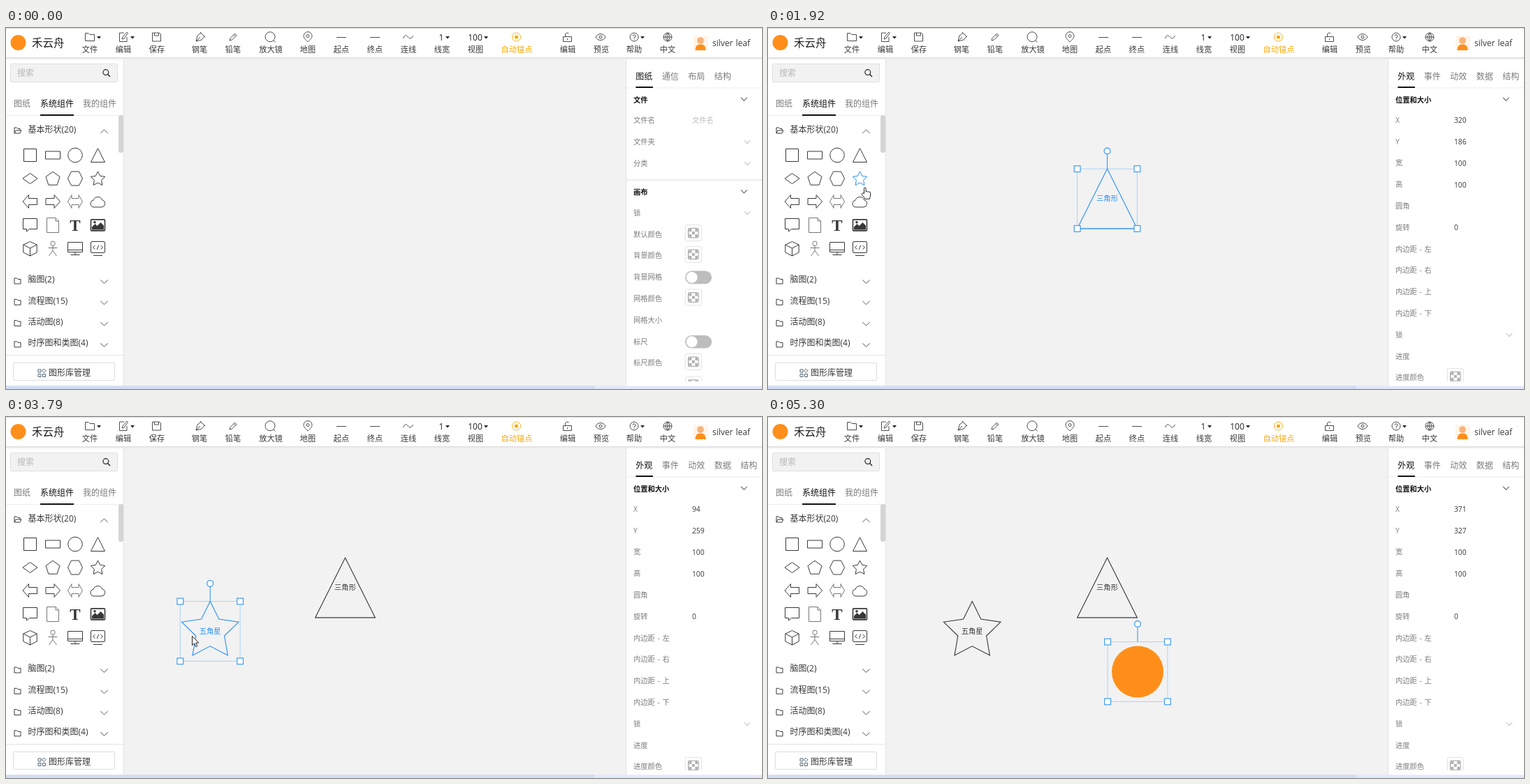
An HTML page for the animation above (5.61 s loop, 1082 by 518 pixels).

```html
<!DOCTYPE html>
<html lang="zh">
<head>
<meta charset="utf-8">
<title>图形编辑器</title>
<style>
html, body { margin: 0; width: 100%; height: 100%; overflow: hidden; background: #fff; }
svg { display: block; width: 1082px; height: 518px; }
text { font-family: "Open Sans", "Noto Sans CJK SC", "Noto Sans CJK", sans-serif; white-space: pre; word-spacing: 1px; }
</style>
</head>
<body>
<svg id="stage" viewBox="0 0 1082 518" xmlns="http://www.w3.org/2000/svg"></svg>
<script>
const LOOP = 5610;
const BLUE = '#2a90f5', INK = '#383838', GREY = '#7c7c7c', ORANGE = '#ff8f1a', GOLD = '#f7ab0a';

// ---- markup helpers ----
const rect = (x, y, w, h, fill, more = '') =>
  `<rect x="${x}" y="${y}" width="${w}" height="${h}" fill="${fill}" ${more}/>`;
const circle = (x, y, r, fill, more = '') =>
  `<circle cx="${x}" cy="${y}" r="${r}" fill="${fill}" ${more}/>`;
const path = (d, more = '') => `<path d="${d}" ${more}/>`;
const group = (inner, more = '') => `<g ${more}>${inner}</g>`;
const at = (x, y, inner, more = '') => group(inner, `transform="translate(${x} ${y})" ${more}`);
const line = (d, color = INK, w = 1) => path(d, `fill="none" stroke="${color}" stroke-width="${w}"`);
const text = (x, cy, s, size = 12, color = INK, more = '') =>
  `<text x="${x}" y="${(cy + size * 0.37).toFixed(2)}" font-size="${size}" fill="${color}" ${more}>${s}</text>`;
const mid = 'text-anchor="middle"';
const chevron = (x, y, w, h, color) => line(`M${x - w} ${y - h / 2}l${w} ${h} ${w} ${-h}`, color);

function ring(n, r, inner) {
  const count = inner ? n * 2 : n;
  const pts = Array.from({ length: count }, (_, i) => {
    const a = i * 2 * Math.PI / count, k = inner && i % 2 ? inner : r;
    return `${(k * Math.sin(a)).toFixed(2)} ${(-k * Math.cos(a)).toFixed(2)}`;
  });
  return `M${pts.join('L')}Z`;
}

// ---- header ----
const FOLDER = 'M-6.5-5.5H-2L0-3.5H6.5V5.5H-6.5Z';
const tools = [
  [120, '文件', 120, path(FOLDER), 133],
  [168, '编辑', 168, path('M1-6H-5.5V6.5H5V0M-2 3L-1 0 5-7 6.5-5.5 1 2Z'), 181],
  [216, '保存', 215.5, path('M-6-6H4L6-4V6H-6ZM-3-6V-2H3V-6')],
  [277, '钢笔', 278, path('M-6 6L-4-2 1-6 6-1 2 4ZM-6 6L0 0M0-7L7 0')],
  [325, '铅笔', 325, path('M-5 5L-4 1.5 2.5-5 5-2.5-1.5 4ZM1-3.5L3.5-1')],
  [379, '放大镜', 378, circle(0, -0.3, 7, 'none') + path('M5 4.7L7.5 7.5')],
  [432, '地图', 432, path('M0 7C-4 3-6 1-6-1.5A6 6 0 0 1 6-1.5C6 1 4 3 0 7Z') + circle(0, -1.5, 2, 'none')],
  [480, '起点', 480, path('M-7 .5H7')],
  [528, '终点', 528, path('M-7 .5H7')],
  [576, '连线', 575.5, path('M-7 2C-4-5-2-2 0 0S4 4 7-2')],
  [624, '线宽', 0, '', 632],
  [672, '视图', 0, '', 687],
  [731, '自动锚点', 730.5, circle(0, 0, 6, 'none') + circle(0, 0, 2.6, GOLD, 'stroke="none"'), 0, GOLD],
  [804, '编辑', 803.5, path('M-6-.5H6V6.5H-6ZM-3-.5V-4A3 3 0 0 1 2-5M0 2V4')],
  [852, '预览', 851, path('M-7 0C-4-6 4-6 7 0C4 6-4 6-7 0Z') + circle(0, 0, 2, 'none')],
  [899, '帮助', 899, circle(0, 0, 6, 'none') + path('M-2-1.5A2 2 0 1 1 0 .8V2M0 3V4'), 911],
  [947, '中文', 947, circle(0, 0, 6, 'none') + path('M-6 0H6M0-6V6M0-6C-4-2-4 2 0 6M0-6C4-2 4 2 0 6')],
];

function header() {
  let s = rect(0, 0, 1082, 43, '#fff') + rect(0, 0, 1082, 1, '#dcdcdc')
    + rect(0, 42, 1082, 1, '#dedede') + rect(0, 43, 1082, 2, '#ececec');
  s += circle(17.5, 21, 11, ORANGE) + text(37, 21.5, '禾云舟', 15.5, '#222');
  for (const [x, label, ix, icon, caret, color = INK] of tools) {
    s += text(x, 31, label, 11.2, color, mid);
    if (icon) s += at(ix, 13, icon, `fill="none" stroke="${color}" stroke-width="0.9"`);
    if (caret) s += path(`M${caret - 3} 12h6l-3 3.4Z`, 'fill="#222"');
  }
  s += text(623, 14, '1', 12, '#222', mid) + text(671.5, 14, '100', 12, '#222', mid);
  s += rect(984, 11, 21, 21, '#fff5e8') + circle(994, 18, 4.8, '#f8b27a')
    + path('M986.5 32C986.5 26 989 23.5 994 23.5S1001.5 26 1001.5 32Z', `fill="${ORANGE}"`);
  return s + text(1011, 21.5, 'silver leaf', 12, INK);
}

// ---- left panel ----
const COLS = [34.5, 67, 99, 131.5], ROWS = [182.5, 216, 249, 282.5, 316.5];
const LEFT = 'M-10.5 0L-2-9.5V-4.5H10V4.5H-2V9.5Z';
const soft = 'stroke="#777"';
const own = 'fill="currentColor" stroke="none"';
const icons = [
  path('M-9-9H9V9H-9Z'),
  path('M-10.5-5.5H10.5V5.5H-10.5Z'),
  circle(0, 0, 10.3, 'none'),
  path('M0-9.8L10 10H-10Z'),
  path('M0-7.5L10.5 0 0 7.5-10.5 0Z'),
  at(0, 0.7, path(ring(5, 10.5))),
  path('M-5.5-10H5.5L10.5 0 5.5 10H-5.5L-10.5 0Z'),
  at(0, 0.7, path(ring(5, 10.8, 5.4))),
  path(LEFT),
  path(LEFT, 'transform="scale(-1 1)"'),
  path('M-10.5 0L-5-9.5V-4.5H5V-9.5L10.5 0 5 9.5V4.5H-5V9.5Z', soft),
  path('M-5.5 8A4.9 4.9 0 0 1-6.5-1.7A6.8 6.8 0 0 1 6.4-2A5.1 5.1 0 0 1 5.5 8Z'),
  path('M-10-9H10V6H-1L-5 9.5V6H-10Z'),
  path('M-8.5-10H4L8.5-5.5V11H-8.5ZM4-10V-5.5H8.5', soft),
  `<text y="8" font-size="23" font-weight="bold" style="font-family:'Liberation Serif',serif" ${mid} ${own}>T</text>`,
  rect(-10, -7.6, 20, 16, 'none', 'stroke-width="1.6" rx="1"')
    + path('M-8.5 7V3L-4-1.5-1 1.5 4-3.5 8.5 1V7Z', own) + circle(-4.5, -3.8, 1.8, 'currentColor', 'stroke="none"'),
  path('M0-10L9.7-5.5V5.5L0 10.5-9.7 5.5V-5.5ZM-9.7-5.5L0-.5 9.7-5.5M0-.5V10.5'),
  circle(0, -7.3, 3.2, 'none', soft) + path('M0-4V3M-6.5-1H6.5M-5.5 10.5L0 3 5.5 10.5', soft),
  path('M-10.5-9H10.5V5H-10.5ZM-10.5 2H10.5M-6.5 9H6.5M0 5V9'),
  rect(-10, -10, 20, 16, 'none', 'rx="1.5"') + path('M-4-4.5L-7-1.7-4 1M4-4.5L7-1.7 4 1M1.3-5L-1.3 1.5M-6.5 10H6.5'),
];
const icon = (i, x, y, color, more = '') =>
  at(x, y, icons[i], `fill="none" stroke="${color}" color="${color}" ${more}`);

function leftPanel() {
  let s = rect(0, 45, 168, 468, '#fff') + rect(168, 44, 1, 469, '#e2e2e2');
  s += rect(6.5, 51.5, 153, 26, '#f2f2f2', 'stroke="#dfdfdf" rx="1"') + text(16, 65, '搜索', 12, '#b8b8b8');
  s += circle(142.8, 63.6, 3.9, 'none', 'stroke="#222" stroke-width="1.2"') + line('M145.7 66.5L149 70', '#222', 1.4);
  s += rect(0, 125, 168, 1, '#eee') + text(11, 108.5, '图纸', 12, GREY)
    + text(49, 108.5, '系统组件', 12, '#111') + text(110, 108.5, '我的组件', 12, GREY) + rect(49, 124, 48, 2, '#111');
  s += rect(161, 125, 7, 54, '#d4d4d4', 'rx="3"');
  s += line('M12 151V143H15.5L17 144.5H20V147M12 151L14 147H22L20 151Z') + text(31.5, 146, '基本形状(20)');
  s += chevron(140.5, 148.5, 5.2, -5, '#555');
  icons.forEach((_, i) => { s += icon(i, COLS[i % 4], ROWS[i >> 2], INK, `id="icon${i}"`); });
  ['脑图(2)', '流程图(15)', '活动图(8)', '时序图和类图(4)'].forEach((name, i) => {
    const y = 361 + i * 30.3;
    s += at(16.5, y + 2, line('M-4.5-4H-1L.5-2.5H4.5V4H-4.5Z')) + text(31.5, y, name) + chevron(140.5, y + 3, 5.2, 5, '#555');
  });
  s += rect(0, 469, 168, 1, '#e4e4e4') + rect(10.5, 480.5, 145, 25, '#fff', 'stroke="#dcdcdc" rx="1"');
  s += at(51, 495, line('M-5-5H-1V-1H-5ZM-5 1.5H-1V5.5H-5ZM1.5 1.5H5.5V5.5H1.5ZM3.3-6L6-3.2 3.3-.5 .6-3.2Z', '#567'));
  return s + text(61, 495, '图形库管理');
}

// ---- right panel ----
const lightChevron = y => chevron(1061, y, 4, 4.5, '#aaa');
const heading = (y, s) => text(898, y, s, 10.28, '#111', 'font-weight="bold"') + chevron(1056.3, y - 0.8, 4.2, 4.8, '#222');
const label = (y, s) => text(898, y, s, 10.28, GREY);
function swatch(y) {
  let s = rect(-11.5, -11.5, 23, 23, '#fff', 'stroke="#e2e2e2" rx="2"') + rect(-7.3, -6.8, 14.6, 13.6, '#fff', 'stroke="#999" rx="1.5"');
  for (const [x, v] of [[-6.5, -6], [2.5, -6], [-2, -2], [-6.5, 2], [2.5, 2]]) s += rect(x, v, 4, 4, '#b2b2b2');
  return at(983.8, y, s);
}
const toggle = y => rect(972, y - 9.3, 38, 18.6, '#bdbdbd', 'rx="9.3"') + circle(981.6, y, 8, '#fff');
const tabs = names => names.map((n, i) => text(901.3 + i * 37.5, 69.5, n, 12, i ? GREY : '#111')).join('');

function pagePanel() {
  let s = tabs(['图纸', '通信', '布局', '结构']) + heading(103, '文件') + heading(235.5, '画布');
  s += label(132, '文件名') + text(982, 132, '文件名', 10.28, '#bbb');
  s += label(163, '文件夹') + lightChevron(163.5) + label(194, '分类') + lightChevron(194.5);
  s += rect(888, 217.5, 194, 1, '#dcdcdc') + label(265, '锁') + lightChevron(265.5);
  ['默认颜色', '背景颜色', '背景网格', '网格颜色', '网格大小', '标尺', '标尺颜色', ''].forEach((n, i) => {
    const y = 295.7 + i * 30.8;
    s += label(y, n);
    if (n.endsWith('颜色') || !n) s += swatch(y - 1.6 + (n ? 0 : 2));
    if (i === 2 || i === 5) s += toggle(y + 0.6);
  });
  return s;
}

function shapePanel() {
  let s = tabs(['外观', '事件', '动效', '数据', '结构']) + heading(103, '位置和大小');
  const names = ['X', 'Y', '宽', '高', '圆角', '旋转', '内边距 - 左', '内边距 - 右', '内边距 - 上', '内边距 - 下', '锁', '进度', '进度颜色'];
  const values = ['', '', '100', '100', '', '0'];
  names.forEach((n, i) => {
    const y = 132 + i * 30.8;
    s += label(y, n);
    if (i < 6) s += text(982, y + 0.4, values[i], 10.28, INK, `id="value${i}"`);
  });
  return s + lightChevron(440.5) + swatch(500);
}

// ---- canvas shapes ----
const HALF = 42.9;
const shapes = [
  { x: 485.5, y: 245, from: 1460, to: 2610, pos: [320, 186],
    art: path(`M0 ${-HALF}L${HALF} ${HALF}H${-HALF}Z`), name: '三角形', nameY: -1 },
  { x: 292.2, y: 307.4, from: 2880, to: 3960, pos: [94, 259],
    art: path(ring(5, HALF, HALF / 2)), name: '五角星', nameY: 0 },
  { x: 529, y: 365.5, from: 4200, to: LOOP, pos: [371, 327],
    art: circle(0, 0, 37, ORANGE, 'stroke="none"'), name: '', nameY: 0 },
];
const handle = (x, y) => rect(x - 4.4, y - 4.4, 8.8, 8.8, '#fff', 'stroke="#3f9cf2" stroke-width="1.2"');
const frame = rect(-HALF, -HALF, HALF * 2, HALF * 2, 'none', 'stroke="#a9d2f7"');
const grips = line(`M0 ${-HALF}V-64`, BLUE) + circle(0, -68.5, 4.4, '#fff', `stroke="${BLUE}" stroke-width="1.2"`)
  + [-1, 1].map(i => handle(i * HALF, -HALF) + handle(i * HALF, HALF)).join('');
const shapeMarkup = (s, i) => at(s.x, s.y,
  group(frame, `id="frame${i}"`) + group(s.art, 'fill="none" stroke="currentColor" stroke-width="1.1"')
  + text(0, s.nameY, s.name, 10.28, 'currentColor', mid) + group(grips, `id="grips${i}"`), `id="shape${i}"`);

const ARROW = 'M.5 .5V13.6L3.5 10.8 5.7 15.6 7.8 14.6 5.7 10H9.8Z';
const HAND = 'M-1.5 8.6V1.3A1.3 1.3 0 0 1 1.1 1.3V6A1.2 1.2 0 0 1 3.4 6.2A1.2 1.2 0 0 1 5.6 6.7A1.1 1.1 0 0 1 7.6 7.3V11C7.6 13 6.5 14 6.5 16.3H-.2C-.5 14.4-3.2 12.4-4.7 9.6C-5.2 8-3.3 7.2-1.5 8.6Z';
const pointer = 'fill="#fff" stroke="#222" stroke-width="1" stroke-linejoin="round"';

document.getElementById('stage').innerHTML =
  '<clipPath id="clip"><rect x="888" y="44" width="194" height="463"/></clipPath>'
  + rect(0, 0, 1082, 518, '#fff') + rect(169, 44, 718, 470, '#f2f2f2')
  + shapes.map(shapeMarkup).join('')
  + leftPanel()
  + rect(887, 44, 1, 470, '#e2e2e2') + rect(888, 44, 194, 470, '#fff') + rect(888, 85.5, 194, 1, '#eee')
  + group(group(pagePanel(), 'id="page"') + group(shapePanel(), 'id="props"'), 'clip-path="url(#clip)"')
  + rect(888, 84, 0, 2, '#111', 'id="bar"')
  + header()
  + rect(0, 513.5, 1082, 4.5, '#e3e8f8') + rect(0, 513.5, 842, 4.5, '#d2dcf4')
  + [3, 7, 15].map(i => icon(i, 0, 0, BLUE, `id="ghost${i}"`)).join('')
  + group(path(ARROW, `id="arrow" ${pointer}`) + path(HAND, `id="hand" ${pointer}`), 'id="cursor"');

// ---- timing ----
const runs = [[70, 590, 8], [650, 650, 1], [830, 1070, 4], [1230, 1320, 2], [1460, 2000, 8], [2090, 2610, 8],
  [2700, 3240, 8], [3330, 3870, 8], [3960, 4520, 8], [4670, 5210, 8], [5300, 5300, 1]];
const ticks = [0];
for (const [a, b, n] of runs)
  for (let i = 0; i < n; i++) ticks.push(Math.floor((a + (b - a) * i / Math.max(1, n - 1)) / 10) * 10);

const moves = [[70, 762, 429], [590, 131, 186], [750, 131, 186], [1070, 485, 244], [1460, 485, 244], [1910, 139, 229],
  [2000, 139, 229], [2090, 131, 222], [2310, 129, 220], [2610, 292, 307], [2880, 292, 307], [3240, 167, 290],
  [3400, 133, 285], [3710, 133, 285], [3790, 266, 314], [3870, 492, 358], [3960, 529, 366], [4600, 529, 366], [5210, 1030, 509]];
const hovers = [[3, 590, 830], [7, 1910, 2310], [15, 3400, 3790]];
const ghosts = [[3, 830, 1230, 1320], [7, 2310, 2600, 2600], [15, 3870, 3960, 4040]];

function spot(t) {
  let i = moves.findIndex(m => m[0] > t);
  if (i < 0) return moves[moves.length - 1].slice(1);
  i = Math.max(i, 1);
  const [a, ax, ay] = moves[i - 1], [b, bx, by] = moves[i];
  const k = Math.max(0, (t - a) / (b - a));
  return [ax + (bx - ax) * k, ay + (by - ay) * k];
}

const el = id => document.getElementById(id);
const set = (id, key, v) => el(id).setAttribute(key, v);
const show = (id, on) => set(id, 'display', on ? 'inline' : 'none');
const within = (t, a, b) => t >= a && t < b;

function draw(t) {
  const q = ticks.filter(v => v <= t).pop();
  const [x, y] = spot(q);
  const hover = hovers.find(h => within(q, h[1], h[2]));

  show('cursor', within(q, 70, 5300));
  set('cursor', 'transform', `translate(${x.toFixed(1)} ${y.toFixed(1)})`);
  show('hand', hover);
  show('arrow', !hover);

  for (const [i] of hovers) {
    const color = hover && hover[0] === i ? BLUE : INK;
    set('icon' + i, 'stroke', color);
    set('icon' + i, 'color', color);
  }
  for (const [i, a, b, c] of ghosts) {
    show('ghost' + i, within(q, a, c));
    set('ghost' + i, 'opacity', q < b ? 0.6 : 0.3);
    set('ghost' + i, 'transform', `translate(${x.toFixed(1)} ${y.toFixed(1)})`);
  }

  let active = null, since = -1e4;
  shapes.forEach((s, i) => {
    const on = within(t, s.from, s.to);
    show('shape' + i, t >= s.from);
    show('frame' + i, on);
    show('grips' + i, on);
    set('shape' + i, 'color', on ? BLUE : INK);
    if (on) active = s;
    if (t >= s.from) since = on ? s.from : s.to;
  });
  show('page', !active);
  show('props', active);
  if (active) active.pos.forEach((v, i) => { el('value' + i).textContent = v; });

  // the tab underline grows out of the panel's left edge
  const k = Math.min(1, Math.max(0, (q - since) / 240));
  set('bar', 'x', 888 + 13.4 * k);
  set('bar', 'width', 24.5 * k);
}

const start = performance.now();
function tick() {
  draw((performance.now() - start) % LOOP);
  requestAnimationFrame(tick);
}
draw(0);
requestAnimationFrame(tick);
</script>
</body>
</html>
```
